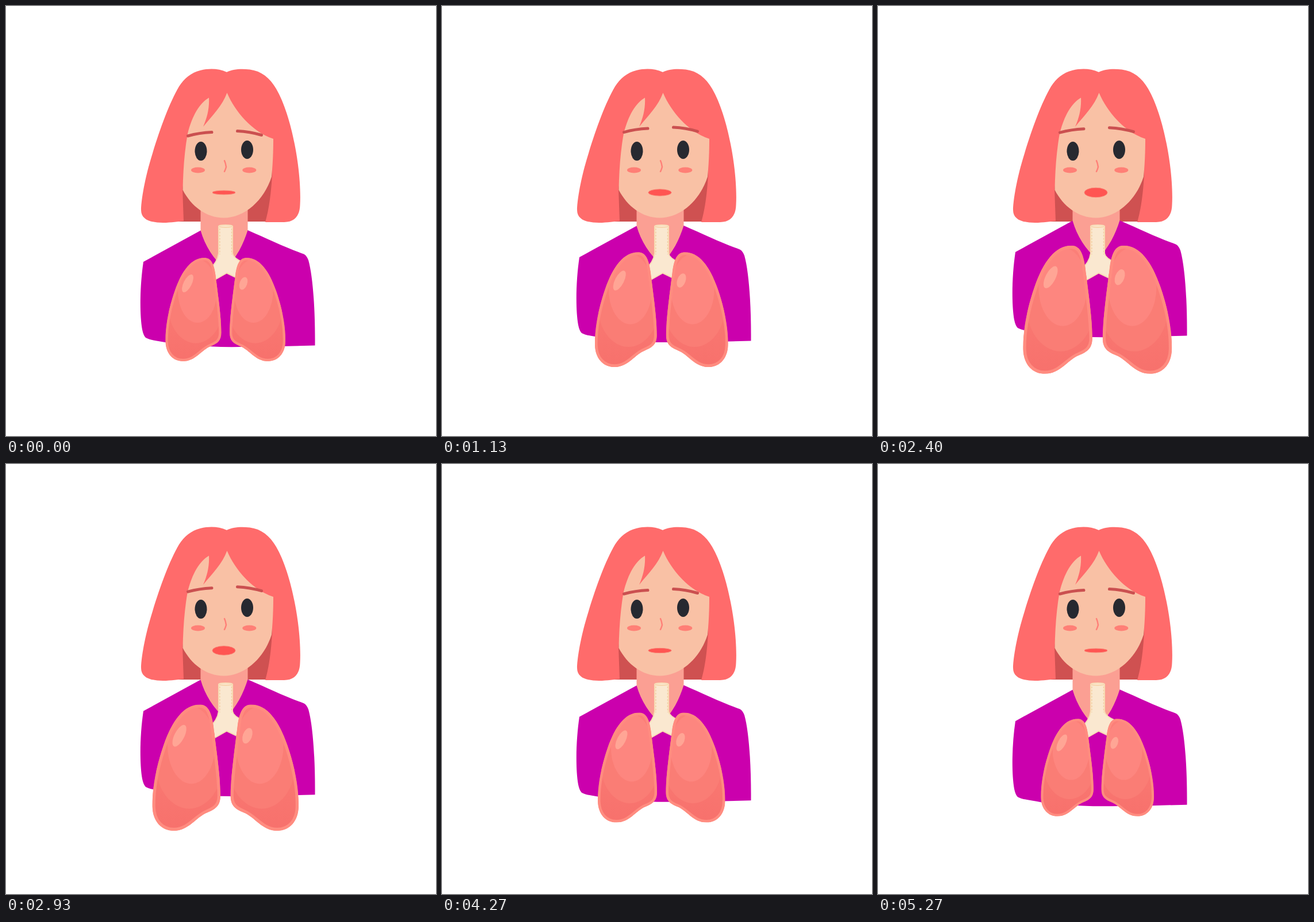
These frames come from a looping animation (748 px wide and 748 px high, 5.34 s). An HTML page:

```html
<!DOCTYPE html>
<html lang="en">
<head>
<meta charset="utf-8">
<title>Breathing</title>
<style>
  html, body { margin: 0; width: 100%; height: 100%; overflow: hidden; background: #fff; }
  svg { display: block; width: 100vw; height: 100vh; }
</style>
</head>
<body>
<svg viewBox="0 0 748 748" xmlns="http://www.w3.org/2000/svg">
  <defs>
    <path id="lungShape" d="M345 438C355.500 438 361.500 446 364.500 468C367.500 494 374.500 540 374.500 568C374.500 582 368 587 356 592C340 598 330 618 308 618C290 618 278 604 277.500 584C277 560 282 529 293.500 496C306 460 323 438 345 438Z"/>
    <clipPath id="lungClip"><use href="#lungShape"/></clipPath>
    <linearGradient id="deep" x1="0" y1="0" x2="0" y2="1">
      <stop offset="0" stop-color="#fc8079"/>
      <stop offset="1" stop-color="#f7716c"/>
    </linearGradient>
    <g id="lung" clip-path="url(#lungClip)">
      <use href="#lungShape" fill="url(#deep)"/>
      <ellipse cx="330" cy="521" rx="48" ry="65.500" fill="#fa7d75"/>
      <ellipse cx="333" cy="496" rx="34" ry="55" fill="#fd867f"/>
      <use href="#lungShape" fill="none" stroke="#ff8c80" stroke-width="8.500"/>
    </g>
  </defs>

  <!-- hair and neck -->
  <path fill="#cf5151" d="M300 280H470V375H300Z"/>
  <path fill="#fb9f93" d="M338.500 330H420.500V465H338.500Z"/>
  <path fill="#ff6b6b" d="M384 115C370 109 355 108 338 112C322 116 310 126 301 140C282 172 262 230 248 280C240 310 235 340 235 355C235 372 252 377 273 377C288 377 300 374.500 309 374L307 318L320 240H461L463 295C461 325 458 352 451 376H484C502 376 511 365 511.500 346C513 320 510 280 502 240C495 204 484 168 470 144C459 125 444 113 424 110.500C408 108.500 394 110 384 115Z"/>

  <!-- face -->
  <path fill="#f9c1a5" d="M353 159.500C337 169 324 190 316 222C310 255 308 290 307.500 320C322 348 348 368.500 379 368.500C415 368.500 449 338 462 297C464 275 465 255 465 231C428 219 398 183 384.500 151C376 174 360 189 343 210C350 194 354 178 353 159.500Z"/>
  <g fill="#272930">
    <ellipse cx="339" cy="252.500" rx="10.500" ry="16.500"/>
    <ellipse cx="419.500" cy="250" rx="10.500" ry="16"/>
  </g>
  <g fill="#ff7f76">
    <ellipse cx="334" cy="285.500" rx="12" ry="5"/>
    <ellipse cx="423.300" cy="285.500" rx="12" ry="5"/>
  </g>
  <path d="M380 269Q382 273 383 280Q382 284 380 288" fill="none" stroke="#ff8078" stroke-width="2.500" stroke-linecap="round"/>
  <g id="brows" fill="none" stroke="#cb5050" stroke-width="5" stroke-linecap="round">
    <path d="M316.500 226Q336 220.500 358 219.500"/>
    <path d="M402.500 217.500Q424 218.500 444.500 224.500"/>
  </g>
  <ellipse id="mouth" cx="379" cy="324.500" rx="20" ry="3.500" fill="#ff5552" stroke="#fb7d70" stroke-width="1"/>

  <path id="shirt" fill="#cb00ad" d="M338.500 390.500L239 445C233 485 232 535 237 563Q239 573 243 577C252 582 268 583 283 586Q318 591.500 355 592.300Q382 593.500 408 593L478 592L537.500 590.500C538 530 534 470 526 442Q523 434 518 431.500C488 421 455 405 420.500 390C413 414 402 437 381 458C361 440 346 417 338.500 390.500Z"/>

  <!-- windpipe -->
  <path fill="#fae8d0" stroke="#f8dbb4" stroke-width="2" stroke-linejoin="round" d="M370 383Q370 381 382 381Q394 381 394 383V430Q395 438 412 446V478L384 464.500L362 477L352 460Q368 446 370 430Z"/>
  <path fill="none" stroke="#f3d0a5" stroke-width="1.500" stroke-dasharray="3 2.500" d="M372 387V432M392.500 387V432"/>
  <path fill="none" stroke="#f6d6ad" stroke-width="2" d="M371 384Q382 386 393 384"/>

  <g id="lungs">
    <use href="#lung"/>
    <use href="#lung" transform="translate(763.500 0) scale(-1 1)"/>
    <g fill="#ffa595">
      <ellipse cx="316" cy="482.500" rx="7" ry="17" transform="rotate(27 316 482.500)"/>
      <ellipse cx="413" cy="482.500" rx="6.500" ry="11.500" transform="rotate(20 413 482.500)"/>
    </g>
  </g>
</svg>
<script>
  const LOOP = 5340, FRAMES = 80, STEP = 66.67;
  const el = id => document.getElementById(id);
  const [shirt, lungs, brows, mouth] = ["shirt", "lungs", "brows", "mouth"].map(el);

  // each track: [time, value] keys joined by straight lines
  const tracks = {
    size: [[0, 1], [1130, 1.11], [2555, 1.256], [2930, 1.22], [5270, 0.942]],
    lift: [[0, 0], [2555, -18.1], [5270, 2.2]],
    brow: [[0, 0], [1580, -9], [3930, 0]],
    lips: [[0, 3.4], [2530, 8.5], [3800, 6.2], [4200, 4.1], [4800, 4.1], [5270, 3.4]]
  };

  function at(keys, t) {
    for (let i = 1; i < keys.length; i++) {
      const [t0, a] = keys[i - 1], [t1, b] = keys[i];
      if (t <= t1) return a + (b - a) * (t - t0) / (t1 - t0);
    }
    return keys[keys.length - 1][1];
  }

  function draw(ms) {
    const t = Math.min(FRAMES - 1, Math.floor((ms % LOOP + 5) / STEP)) * STEP;
    lungs.setAttribute("transform",
      `translate(381.500 527) scale(${at(tracks.size, t)}) translate(-381.500 -527)`);
    shirt.setAttribute("transform", `translate(0 ${at(tracks.lift, t)})`);
    brows.setAttribute("transform", `translate(0 ${at(tracks.brow, t)})`);
    mouth.setAttribute("ry", at(tracks.lips, t));
  }

  const start = performance.now();
  function tick(now) {
    draw(Math.max(0, now - start));
    requestAnimationFrame(tick);
  }
  draw(0);
  requestAnimationFrame(tick);
</script>
</body>
</html>
```
